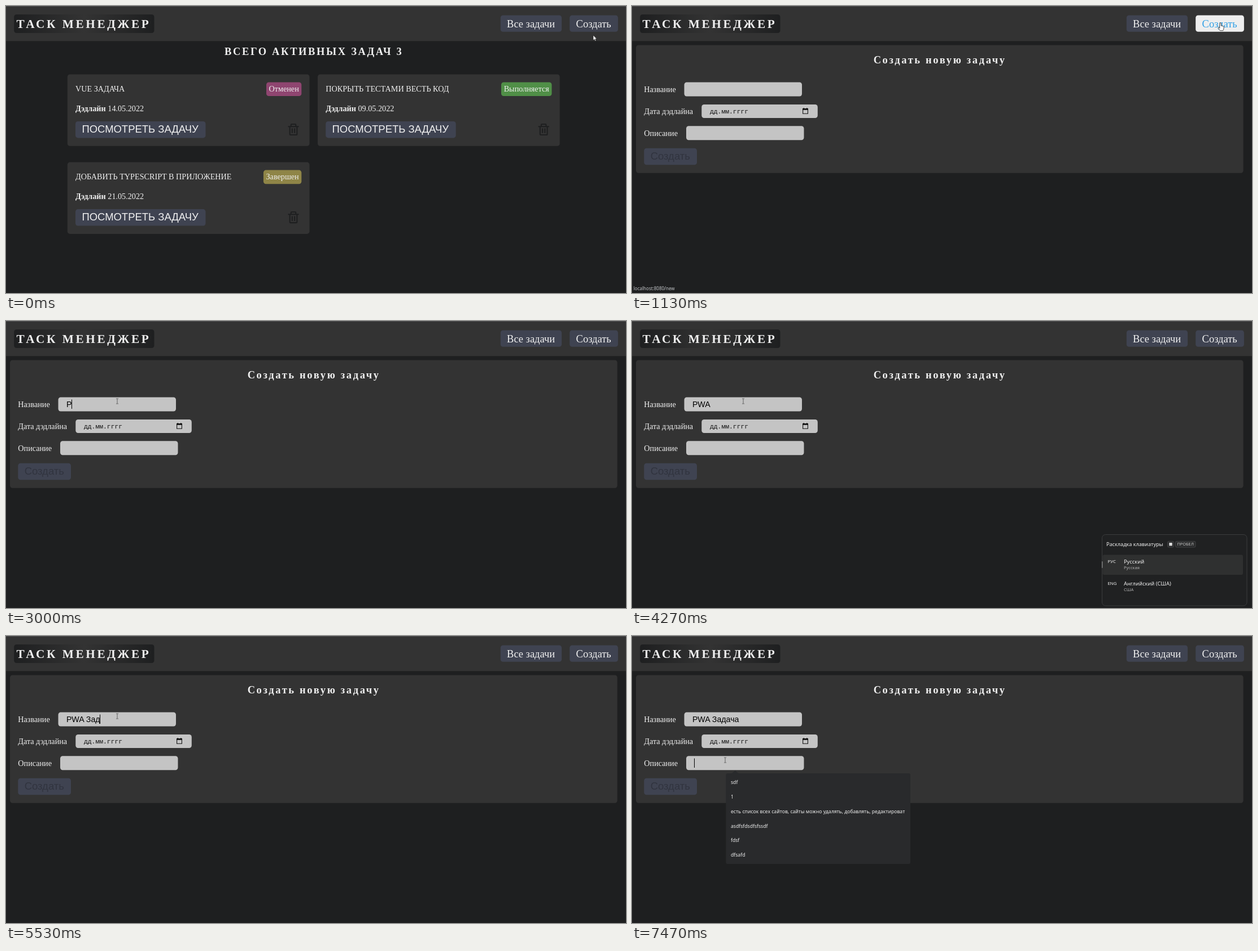
Write an HTML page that moves like this. It is 1098x510 px and loops after 8000 ms.

```html
<!DOCTYPE html>
<html lang="ru">
<head>
<meta charset="utf-8">
<title>Таск менеджер</title>
<style>
  html, body { margin: 0; width: 100%; height: 100%; overflow: hidden; background: #1e1f20; }
  svg { display: block; width: 100%; height: 100%; }
  text { white-space: pre; fill: #f0f0f0; }
  .serif { font-family: "Liberation Serif", "Times New Roman", serif; }
  .sans { font-family: "Liberation Sans", Arial, sans-serif; }
  .mono { font-family: "Liberation Mono", "Courier New", monospace; }
  .ui { font-family: "Noto Sans", "Open Sans", sans-serif; }
  .bold { font-weight: 700; }
  .semi { font-weight: 500; }
</style>
</head>
<body>
<svg id="stage" viewBox="0 0 1098 510" xmlns="http://www.w3.org/2000/svg"></svg>
<script>
const LOOP = 8000, STEP = 1000 / 15;
const REM = 14.2, BIG = 18.47;
const BG = '#1e1f20', PANEL = '#333333', BUTTON = '#3f4351', FIELD = '#c4c4c4';

const rect = (x, y, w, h, fill, r = 4.4, more = '') =>
  `<rect x="${x}" y="${y}" width="${w}" height="${h}" rx="${r}" fill="${fill}" ${more}/>`;
const text = (x, y, size, cls, str, more = '') =>
  `<text x="${x}" y="${y}" font-size="${size}" class="${cls}" ${more}>${str}</text>`;
const group = (id, body) => `<g id="${id}">${body}</g>`;
const heading = (y, str) =>
  text(545.2, y, BIG, 'serif bold', str, 'text-anchor="middle" letter-spacing="2.66"');

const trash = (x, y) =>
  `<path transform="translate(${x} ${y}) scale(1.06) translate(-12 -12)" fill="${BG}" fill-rule="evenodd"
    d="M5 20a2 2 0 0 0 2 2h10a2 2 0 0 0 2-2V8h2V6h-4V4a2 2 0 0 0-2-2H9a2 2 0 0 0-2 2v2H3v2h2zM9 4h6v2H9zM7 8h10v12H7zM9 10h2v8H9zM13 10h2v8h-2z"/>`;

function card(x, y, title, date, status, color, badgeW) {
  return `<g transform="translate(${x} ${y})">` +
    rect(0, 0, 428.7, 127.3, PANEL) +
    text(14.2, 30.4, REM, 'serif', title) +
    rect(414.5 - badgeW, 14, badgeW, 24.6, color) +
    text(414.5 - badgeW / 2, 30.4, REM, 'serif', status, 'text-anchor="middle"') +
    text(14.2, 65.6, REM, 'serif', `<tspan class="bold">Дэдлайн</tspan> ${date}`) +
    rect(14.2, 83.5, 230.5, 29.4, BUTTON) +
    text(25.6, 103.6, BIG, 'sans', 'ПОСМОТРЕТЬ ЗАДАЧУ') +
    trash(400.2, 98) + '</g>';
}

const header =
  rect(0, 0, 1098, 62.3, PANEL, 0) +
  rect(0, 0, 1098, 1, '#505152', 0) +
  rect(14.2, 15, 248.3, 33, 'url(#fade)') +
  text(18.5, 38.9, 21.3, 'serif bold', 'ТАСК МЕНЕДЖЕР', 'letter-spacing="3.55"') +
  rect(875.8, 16.5, 108.3, 29.3, BUTTON) +
  text(887.1, 37.5, BIG, 'serif', 'Все задачи') +
  rect(998.2, 16.5, 85.7, 29.3, BUTTON, 4.4, 'id="newBox"') +
  text(1009.6, 37.5, BIG, 'serif', 'Создать', 'id="newText"');

const list =
  heading(87.3, 'ВСЕГО АКТИВНЫХ ЗАДАЧ 3') +
  card(108.8, 121.5, 'VUE ЗАДАЧА', '14.05.2022', 'Отменен', '#8f4570', 62.3) +
  card(552, 121.5, 'ПОКРЫТЬ ТЕСТАМИ ВЕСТЬ КОД', '09.05.2022', 'Выполняется', '#508f47', 89.5) +
  card(108.8, 277.6, 'ДОБАВИТЬ TYPESCRIPT В ПРИЛОЖЕНИЕ', '21.05.2022', 'Завершен', '#8f8547', 67.4);

const form =
  rect(7.1, 69.5, 1075.5, 227.2, PANEL) +
  heading(101.8, 'Создать новую задачу') +
  text(21.3, 152.6, REM, 'serif', 'Название') +
  rect(92.5, 135.5, 208.5, 25, FIELD) +
  text(21.3, 191.6, REM, 'serif', 'Дата дэдлайна') +
  rect(123.3, 175, 205.5, 24, FIELD) +
  text(138, 191.2, 11.35, 'mono', 'дд.мм.гггг', 'style="fill:#111"') +
  `<path d="M302.6 182.6h8.8v8.6h-8.8z" fill="none" stroke="#111" stroke-width="1.1"/>
   <path d="M302 182h10v2.8h-10zM303.6 181h1.3v1.5h-1.3zM309.1 181h1.3v1.5h-1.3z" fill="#111"/>` +
  text(21.3, 230.6, REM, 'serif', 'Описание') +
  rect(96, 213.2, 208.5, 25, FIELD) +
  rect(21.3, 252.8, 93.7, 29.5, BUTTON) +
  text(32.7, 273.2, BIG, 'sans', 'Создать', 'style="fill:#31343f"') +
  text(106.9, 152.9, REM, 'sans', '', 'id="typed" style="fill:#000"') +
  rect(0, 0, 1, 16.5, '#000', 0, 'id="caret"');

const hints = ['sdf', '1', 'есть список всех сайтов, сайты можно удалять, добавлять, редактироват',
  'asdfsfdsdfsfssdf', 'fdsf', 'dfsafd'];
const dropdown =
  rect(166.3, 244, 326.7, 161, '#292a2c', 3) +
  '<path d="M176.5 244.5l6.2-5.5 6.2 5.5z" fill="#292a2c"/>' +
  hints.map((s, i) => text(175, 263.4 + i * 25.7, 8.6, 'ui', s)).join('');

const layout = (y, code, name, sub) =>
  text(842.5, y, 7.8, 'ui semi', code) +
  text(871, y + .5, 9.3, 'ui', name) +
  text(871, y + 11.2, 7.5, 'ui', sub, 'style="fill:#b0b0b0"');
const keyboard =
  rect(832.5, 379.5, 256.5, 126.5, '#202122', 6, 'stroke="#3b3c3d"') +
  text(840, 400.3, 9.1, 'ui semi', 'Раскладка клавиатуры') +
  rect(948.5, 391.5, 11, 10.5, '#2a2b2c', 2, 'stroke="#4a4b4c" stroke-width=".8"') +
  rect(951.3, 394, 5.4, 5.4, '#dddddd', 0) +
  rect(962.5, 391.5, 35.5, 10.5, '#2a2b2c', 2, 'stroke="#4a4b4c" stroke-width=".8"') +
  text(980.2, 399.4, 7.4, 'ui', 'ПРОБЕЛ', 'text-anchor="middle" style="fill:#c8c8c8"') +
  rect(833.5, 415.5, 248.5, 35.5, '#2f3030', 3) +
  rect(832, 427, 1.4, 12, '#8a8a8a', .7) +
  layout(430.2, 'РУС', 'Русский', 'Русская') +
  layout(469.2, 'ENG', 'Английский (США)', 'США');

const cursors =
  '<path id="arrow" d="M0 0V9L2.1 7.1 3.5 10.2 4.9 9.5 3.6 6.6H6.2Z" fill="#fff" stroke="#222" stroke-width=".6"/>' +
  '<path id="hand" d="M-1.2 8V1a1.2 1.2 0 0 1 2.4 0V5l3.6 .8q1.5 .4 1.4 2l-.5 3.6-1 2.3H-.5L-3.8 9.5q-.8-1 .3-1.4 .9-.2 2.3 1.5Z" fill="#fff" stroke="#333" stroke-width=".9"/>' +
  '<path id="beam" d="M-2 -4.5H-.6L0 -4 .6 -4.5H2M0 -4V4M-2 4.5H-.6L0 4 .6 4.5H2" fill="none" stroke="#555" stroke-width=".9"/>';

const stage = document.getElementById('stage');
stage.innerHTML =
  `<defs><linearGradient id="fade"><stop stop-color="${BG}"/><stop offset=".5" stop-color="${PANEL}"/><stop offset="1" stop-color="${BG}"/></linearGradient></defs>` +
  rect(0, 0, 1098, 510, BG, 0) + header + group('list', list) + group('form', form) +
  group('dropdown', dropdown) +
  text(2.8, 505.4, 8, 'ui', 'localhost:8080/new', 'id="status" style="fill:#c4c7ca"') +
  group('keyboard', keyboard) + group('cursor', cursors);

const el = {};
stage.querySelectorAll('[id]').forEach(n => el[n.id] = n);

const show = (node, on) => node.style.display = on ? '' : 'none';
const clamp = v => Math.max(0, Math.min(1, v));
const ease = v => v * v * (3 - 2 * v);
const ramp = (t, a, b) => clamp((t - a) / (b - a));
const mix = (a, b, p) => `rgb(${a.map((v, i) => Math.round(v + (b[i] - v) * p))})`;

const NAME = 'PWA Задача';
const keyTimes = [3000, 3133, 3400, 3733, 4667, 5000, 5533, 5667, 5933, 6133];
const BLINK = 533;

// pointer moves: start, end, destination
const moves = [[267, 600, 1042, 30], [1267, 1600, 197, 142.5], [6600, 7200, 165, 220.5]];

function pointer(t) {
  let x = 1040, y = 52;
  for (const [a, b, tx, ty] of moves) {
    const p = ease(ramp(t, a, b));
    x += (tx - x) * p;
    y += (ty - y) * p;
  }
  return [x, y];
}

function pointerKind(x, y, onForm) {
  if (x > 998 && x < 1084 && y > 16 && y < 46) return 'hand';
  const inName = x > 92 && x < 301 && y > 135 && y < 161;
  const inNote = x > 96 && x < 305 && y > 213 && y < 239;
  return onForm && (inName || inNote) ? 'beam' : 'arrow';
}

function draw(time) {
  const t = Math.floor((time % LOOP + 5) / STEP) * STEP + 1;
  const onForm = t >= 1133;
  show(el.list, !onForm);
  show(el.form, onForm);

  const hover = ease(ramp(t, 267, 600)) * (1 - ease(ramp(t, 1333, 1667)));
  el.newBox.setAttribute('fill', mix([63, 67, 81], [238, 238, 238], hover));
  el.newText.style.fill = mix([240, 240, 240], [48, 160, 230], hover);
  el.status.style.opacity = ramp(t, 733, 867) * (1 - ramp(t, 1667, 1933));

  const count = keyTimes.filter(k => t >= k).length;
  el.typed.textContent = NAME.slice(0, count);
  const inNote = t >= 7467;
  const since = inNote ? 7467 : count ? keyTimes[count - 1] : 1600;
  show(el.caret, t >= 1600 && Math.floor((t - since) / BLINK) % 2 === 0);
  const caretX = inNote ? 110.2 : 106.9 + (count && onForm ? el.typed.getComputedTextLength() : 0);
  el.caret.setAttribute('x', Math.floor(caretX));
  el.caret.setAttribute('y', inNote ? 217.5 : 139.5);
  show(el.dropdown, inNote);

  show(el.keyboard, t >= 4267 && t < 4400);
  const leave = ramp(t, 4267, 4400);
  const away = leave > .2 ? leave : 0;
  el.keyboard.setAttribute('transform', `translate(0 ${away * 24})`);
  el.keyboard.style.opacity = 1 - away;

  const [x, y] = pointer(t);
  const kind = pointerKind(x, y, onForm);
  for (const k of ['arrow', 'hand', 'beam']) show(el[k], k === kind);
  el.cursor.setAttribute('transform', `translate(${x} ${y})`);
}

const start = performance.now();
function tick() {
  draw(performance.now() - start);
  requestAnimationFrame(tick);
}
tick();
</script>
</body>
</html>
```
